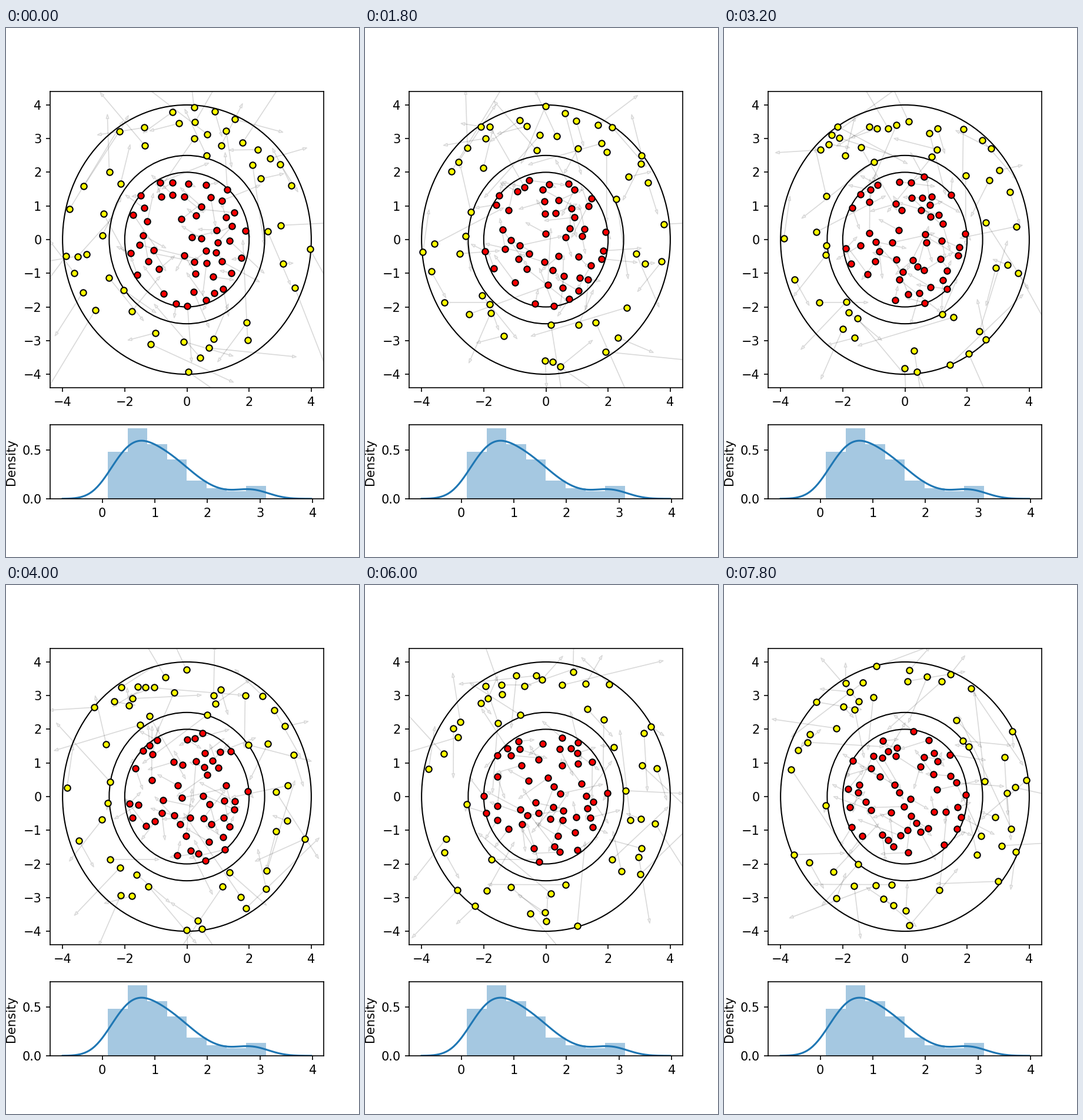
These frames come from a looping animation (600x900 px, 8 s). A matplotlib script:

```python
import numpy as np
import matplotlib.pyplot as plt
from matplotlib.animation import FuncAnimation
from matplotlib.collections import PolyCollection

FRAMES, DT, SUB = 40, 0.05, 4
COUNT = 50            # particles in each region
CONTACT = 0.24        # centre distance at which two particles bounce
SPACING = 0.3         # smallest distance between starting places
BLUE = "#1f77b4"

rng = np.random.default_rng(12)


def scatter(inner, outer):
    """Random starting places, even over a ring, that keep their distance."""
    places = []
    while len(places) < COUNT:
        r = np.sqrt(rng.uniform(inner ** 2, outer ** 2))
        a = rng.uniform(0, 2 * np.pi)
        p = r * np.array([np.cos(a), np.sin(a)])
        if all(np.hypot(*(p - q)) > SPACING for q in places):
            places.append(p)
    return np.array(places)


def bounce_walls(p, v, inner, outer):
    r = np.hypot(*p.T)
    n = p / r[:, None]
    out = (n * v).sum(1)
    hit = ((r > outer) & (out > 0)) | ((r < inner) & (out < 0))
    v[hit] -= 2 * out[hit, None] * n[hit]


def bounce_pairs(p, v):
    gap = np.hypot(*(p[:, None] - p).transpose(2, 0, 1))
    for i, j in np.argwhere(np.triu(gap < CONTACT, 1)):
        n = (p[i] - p[j]) / gap[i, j]
        closing = (v[i] - v[j]) @ n
        if closing < 0:
            v[i] -= closing * n
            v[j] += closing * n


def history(speed, inner, outer):
    """Positions and velocities of one gas for every frame."""
    p = scatter(inner, outer)
    a = rng.uniform(0, 2 * np.pi, COUNT)
    v = speed[:, None] * np.column_stack([np.cos(a), np.sin(a)])
    states = []
    for _ in range(FRAMES):
        states.append((p.copy(), v.copy()))
        for _ in range(SUB):
            p += v * DT / SUB
            bounce_walls(p, v, inner, outer)
            bounce_pairs(p, v)
    return states


def arrows(p, v):
    """Shaft plus a small triangular head for every particle."""
    u = v / np.maximum(np.hypot(*v.T), 1e-9)[:, None]
    side = u[:, ::-1] * [-0.04, 0.04]
    base = p + v
    return np.stack([p, base, base + side, base + 0.12 * u,
                     base - side, base], axis=1)


# Starting speeds: bin counts, each bin filled evenly or leaning to one side.
counts = np.array([18, 27, 21, 15, 7, 4, 3, 5])
lean = [1, 1, 0.8, 0.8, 1.2, 1.8, 0.5, 1]
edges = np.linspace(0.107, 3.11, len(counts) + 1)
width = edges[1] - edges[0]
speeds = np.concatenate([e + width * ((np.arange(c) + 0.5) / c) ** k
                         for e, c, k in zip(edges, counts, lean)])

# The inner gas is mostly the slower half.
order = np.argsort(speeds + rng.normal(0, 0.5, len(speeds)))
red = history(speeds[order[:COUNT]], 0, 2)
yellow = history(speeds[order[COUNT:]], 2.5, 4)

fig, (ax, hist) = plt.subplots(
    2, 1, figsize=(4, 6), dpi=150,
    gridspec_kw={"height_ratios": [4, 1], "hspace": 0.2})
fig.subplots_adjust(left=0.125, right=0.9, bottom=0.11, top=0.88)

ax.set(xlim=(-4.4, 4.4), ylim=(-4.4, 4.4),
       xticks=range(-4, 5, 2), yticks=range(-4, 5))
for radius in (2, 2.5, 4):
    ax.add_patch(plt.Circle((0, 0), radius, fill=False, lw=1))
trails = PolyCollection([], closed=False, facecolors="none",
                        edgecolors=(0, 0, 0, 0.15), linewidths=0.8,
                        joinstyle="round", zorder=0.9)
ax.add_collection(trails)
dot = dict(marker="o", ls="", ms=5, mec="black", mew=1)
yellow_dots, = ax.plot([], [], mfc="yellow", **dot)
red_dots, = ax.plot([], [], mfc="red", **dot)

# Histogram of the speeds with a Gaussian density estimate.
bw = 0.287
grid = np.linspace(edges[0] - 3 * bw, edges[-1] + 3 * bw, 200)
density = np.exp(-((grid[:, None] - speeds) / bw) ** 2 / 2).mean(1)
density /= bw * np.sqrt(2 * np.pi)
hist.bar(edges[:-1], counts / (counts.sum() * width), width, align="edge",
         color=BLUE, alpha=0.4, lw=0)
hist.plot(grid, density, color=BLUE, lw=1.5)
hist.set(xlim=(-0.989, 4.207), ylim=(0, 0.755), xticks=range(5),
         yticks=[0, 0.5], ylabel="Density")


def draw(k):
    red_dots.set_data(*red[k][0].T)
    yellow_dots.set_data(*yellow[k][0].T)
    trails.set_verts(np.concatenate([arrows(*red[k]), arrows(*yellow[k])]),
                     closed=False)
    return trails, red_dots, yellow_dots


anim = FuncAnimation(fig, draw, frames=FRAMES, interval=200,
                     init_func=lambda: draw(0), repeat=True, repeat_delay=0)
plt.show()
```
